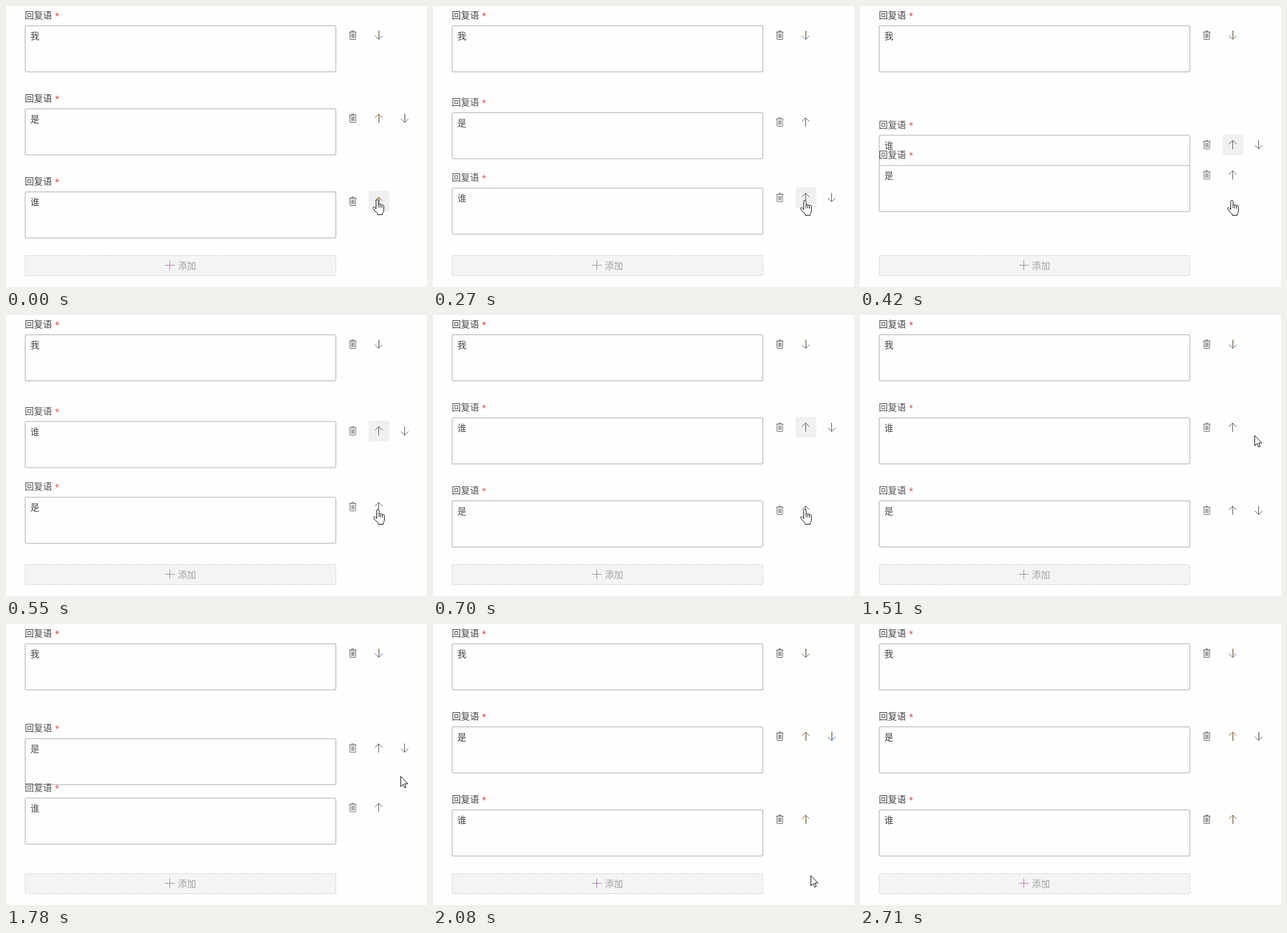
Write an HTML page that moves like this. It is 649 by 433 pixels and loops after 3700 ms.

```html
<!DOCTYPE html>
<html lang="zh-CN">
<head>
<meta charset="utf-8">
<title>回复语排序</title>
<style>
  html, body { margin: 0; width: 100%; height: 100%; overflow: hidden; background: #fefefe; }
  svg { position: absolute; left: 0; top: 0; }
  .panel { position: absolute; left: 29px; top: 384px; width: 478px; height: 30px;
    border: 1px dashed #d2d0ce; border-radius: 2px; background: #f4f4f4; }
  text { font: 14px "Noto Sans CJK SC", "Noto Sans CJK", sans-serif; fill: #505050; }
  .star { font: 12px "Open Sans", sans-serif; fill: #dc4a4e; }
  .box { fill: #fefefe; stroke: #b0aeac; }
  .hover { fill: #f0f0f0; }
  .icon path { fill: none; stroke: #5c5c5c; }
  .icon .fringe { stroke: none; }
  .sharp text { fill: #444348; }
  .sharp .star { fill: #d9363b; }
  .sharp .trash path { stroke: #4a4950; }
  .sharp .up .head { stroke: #96662c; }
  .sharp .down .head { stroke: #47749f; }
  .sharp .stem { stroke: #b07d3c; }
  .sharp .icon .fringe { stroke: #93b0cb; }
  .add path { stroke: #979593; }
  .add text { fill: #a19f9d; }
  .add.sharp path { stroke: #b183b9; }
  .cursor path { fill: #fff; stroke: #15151f; stroke-linejoin: round; }
</style>
</head>
<body>
<div class="panel"></div>
<svg width="649" height="433" viewBox="0 0 649 433">
  <g id="add" class="add">
    <path d="M245 399.5H260M252.5 392V407"/>
    <text x="265" y="405">添加</text>
  </g>
  <g id="rows"></g>
  <g id="hand" class="cursor">
    <path d="M5.5 14.5V2.3a1.8 1.8 0 0 1 3.6 0V8.2c0-1.9 2.7-1.7 2.7.3c.3-1.5 2.7-1.3 2.7.6c.4-1.2 2.9-.9 2.9 1.2V16c0 2.6-1 4-1.9 5.4V23.5H7.8V21.7C5.5 19.7 2.8 16.9.9 13.9C0 12.2 2 10.8 3.6 12.4Z"/>
    <path d="M9.1 8.2V12.5M11.8 8.5V12.8M14.5 9.1V13.1"/>
  </g>
  <g id="arrow" class="cursor">
    <path d="M.5 .7V16.5L4.2 13L6.6 18.5L8.9 17.5L6.6 12.2H11.5Z"/>
  </g>
</svg>
<script>
const LOOP = 3700, BEAT = 135, GAP = 128, SLIDE = 400;
const SWAP = 2, LEAVE = 7, SWAP_BACK = 11;
const $ = id => document.getElementById(id);

// Pointer key points: beat, x, y
const path = [[0, 565, 298], [1, 566, 299], [6, 566, 299], [7, 594, 286],
  [10, 608, 179], [12, 608, 190], [13, 608, 234], [15, 582, 387],
  [17, 596, 342], [20, 594, 440], [30, 594, 440]];

const shapes = {
  trash: `<path transform="translate(-6.5 -7) scale(.875)" d="M1 2.5H14M5.5 2.5V.5H9.5V2.5
    M2.5 2.5V14.5q0 1 1 1H11.5q1 0 1 -1V2.5M5.5 5V13M7.5 5V13M9.5 5V13"/>`,
  up: `<path class="fringe" d="M.5 -5.5V7"/><path class="stem" d="M-.5 -6.5V7"/>
    <path class="head" d="M-6.3 -.8L-.5 -6.6L5.3 -.8"/>`,
  down: `<path class="fringe" d="M.5 -7V5.5"/><path class="stem" d="M-.5 -7V6.5"/>
    <path class="head" d="M-6.3 .8L-.5 6.6L5.3 .8"/>`
};
const icon = (name, x) =>
  `<g class="icon ${name}" transform="translate(${x} 45)">${shapes[name]}</g>`;

function addRow(y, value, arrows) {
  const row = document.createElementNS("http://www.w3.org/2000/svg", "g");
  row.innerHTML = `<text x="29" y="19">回复语</text>
    <text class="star" x="75.5" y="20">*</text>
    <rect class="box" x="29.5" y="30.5" width="479" height="71" rx="1.5"/>
    <text class="value" x="37.5" y="51">${value}</text>
    <rect class="hover" x="559" y="29" width="32" height="32" rx="2" visibility="hidden"/>
    ${icon("trash", 534.5)}${arrows.map((a, i) => icon(a, 575 + 40 * i)).join("")}`;
  row.setAttribute("class", "sharp");
  $("rows").append(row);
  move(row, 0, y);
  return row;
}

function move(el, x, y) {
  el.setAttribute("transform", `translate(${x} ${y})`);
}

function show(el, on) {
  el.setAttribute("visibility", on ? "visible" : "hidden");
}

// cubic-bezier(.25, .1, .25, 1)
function ease(x) {
  if (x <= 0) return 0;
  if (x >= 1) return 1;
  const curve = (a, b, u) => 3 * a * u * (1 - u) ** 2 + 3 * b * u * u * (1 - u) + u ** 3;
  let lo = 0, hi = 1;
  for (let i = 0; i < 24; i++) {
    const mid = (lo + hi) / 2;
    if (curve(.25, .25, mid) < x) lo = mid; else hi = mid;
  }
  return curve(.1, 1, lo);
}

function pointerAt(beat) {
  const i = path.findIndex(p => p[0] > beat);
  const [b0, x0, y0] = path[i - 1], [b1, x1, y1] = path[i];
  const k = (beat - b0) / (b1 - b0);
  return [x0 + (x1 - x0) * k, y0 + (y1 - y0) * k].map(Math.round);
}

addRow(0, "我", ["down"]);
const middle = addRow(GAP, "是", ["up", "down"]);
const last = addRow(2 * GAP, "谁", ["up"]);

function draw(beat) {
  const swapped = beat >= SWAP && beat < SWAP_BACK;
  const since = beat - (beat < SWAP_BACK ? SWAP : SWAP_BACK);
  const sliding = since >= 0 && since < 4;
  const lead = swapped ? 25 : -45;
  const offset = since < 0 ? 0 : GAP * (1 - ease((since * BEAT + lead) / SLIDE));

  move(middle, 0, GAP + offset);
  move(last, 0, 2 * GAP - offset);
  middle.querySelector(".value").textContent = swapped ? "谁" : "是";
  last.querySelector(".value").textContent = swapped ? "是" : "谁";
  show(middle.querySelector(".hover"), swapped && sliding);
  show(last.querySelector(".hover"), beat < SWAP);
  for (const el of [middle, last, $("add")]) el.classList.toggle("sharp", !sliding);

  const pointing = beat < LEAVE;
  show($("hand"), pointing);
  show($("arrow"), !pointing);
  move(pointing ? $("hand") : $("arrow"), ...pointerAt(beat));
}

// The screen repaints once per beat
const origin = performance.now();
function frame() {
  draw(Math.floor((performance.now() - origin) % LOOP / BEAT));
  requestAnimationFrame(frame);
}
frame();
</script>
</body>
</html>
```
